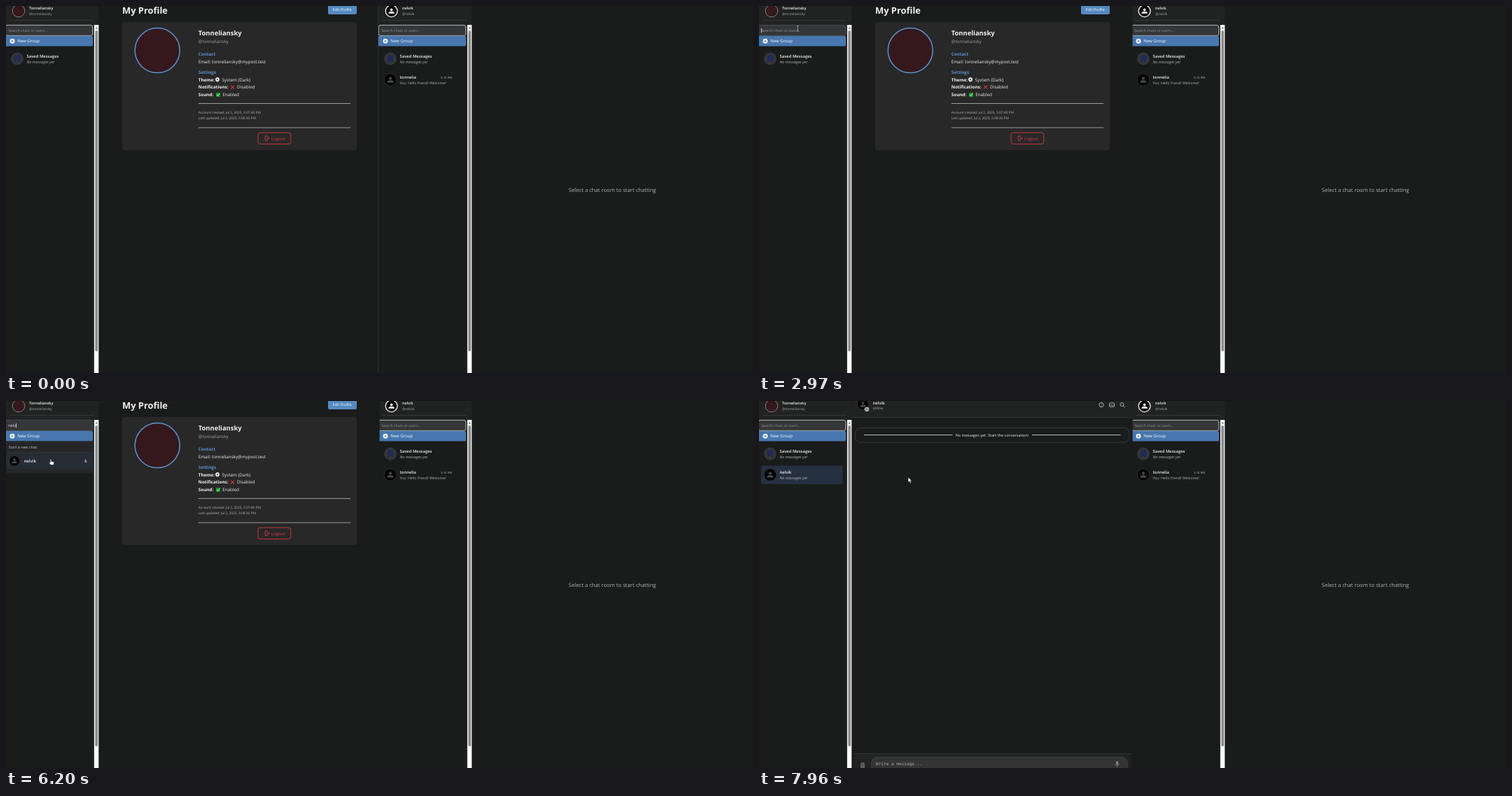
An HTML page that plays this animation: 1067 by 525 pixels, repeating every 7.99 s.

```html
<!DOCTYPE html>
<html lang="en">
<head>
<meta charset="utf-8">
<title>Chat demo</title>
<style>
html, body { margin: 0; width: 100%; height: 100%; overflow: hidden; background: #1a1b1b; }
svg { display: block; width: 100vw; height: 100vh; }
text { font-family: "Open Sans", "Noto Sans", sans-serif; text-rendering: geometricPrecision; white-space: pre; }
.b { font-weight: 700; }
.s { font-weight: 600; }
.i { font-style: italic; }
.m { font-family: "DejaVu Sans Mono", "Liberation Mono", monospace; }
</style>
</head>
<body>
<svg id="stage" viewBox="0 0 1067 525" xmlns="http://www.w3.org/2000/svg"></svg>
<script>
const LOOP = 7990;
const BG = '#1a1b1b', BAR = '#212222', FIELD = '#343637', LIGHT = '#c9cacb', BLUE = '#5b93cf';
const FOCUS = 2730, OPEN = 6690;

const text = (x, y, size, fill, str, cls = '') =>
  `<text x="${x}" y="${y}" font-size="${size}" fill="${fill}" class="${cls}">${str}</text>`;
const rect = (x, y, w, h, fill, extra = '') =>
  `<rect x="${x}" y="${y}" width="${w}" height="${h}" fill="${fill}" ${extra}/>`;
const circle = (x, y, r, fill, extra = '') =>
  `<circle cx="${x}" cy="${y}" r="${r}" fill="${fill}" ${extra}/>`;
const path = (d, stroke, width = 1, fill = 'none') =>
  `<path d="${d}" stroke="${stroke}" stroke-width="${width}" fill="${fill}"/>`;
const group = (id, body, extra = '') => `<g id="${id}" ${extra}>${body}</g>`;

const person = (x, y, s, fill) => circle(x, y - s * .45, s * .45, fill) +
  `<path d="M${x - s} ${y + s * .9}v${-s * .2}q0 ${-s * .55} ${s} ${-s * .55}t${s} ${s * .55}v${s * .2}z" fill="${fill}"/>`;
const avatar = (x, y, r) => circle(x, y, r, '#050505', 'stroke="#38393a" stroke-width=".7"') + person(x, y, r * .5, '#4b4c4d');

const savedRow = () =>
  circle(16, 75.5, 9, '#353637') +
  '<path d="M11.8 70.2h8.4v11l-4.2-3-4.2 3z" fill="#202b56"/>' +
  text(29.5, 74, 5.9, '#eee', 'Saved Messages', 's') +
  text(29.5, 82, 5.45, '#b5b5b5', 'No messages yet', 'i');

function sidebar(id, name, tag, face) {
  return rect(-2, 0, 134, 27, BAR) + rect(5, 20, 120, .8, '#3c3d3d') + face +
    text(33, 4.8, 5.45, '#eee', name, 's') + text(33, 13, 4.8, '#aaa', tag) +
    rect(124.3, 27, 1.7, 498, '#2c2d2d') +
    rect(126, 27, 6.3, 498, '#fff') + rect(127.3, 35, 3.8, 459, '#8b8b8b', 'rx="1.8"') +
    '<path d="M127.4 32.4l1.8-2.6 1.8 2.6z" fill="#777"/>' +
    rect(-.8, 27.4, 124.6, 15, FIELD, `id="${id}Field" rx="2.6" stroke="${LIGHT}" stroke-width=".9"`) +
    group(id + 'Hint', text(3.2, 36.9, 5.25, '#8f9294', 'Search chats or users...')) +
    rect(-1.5, 42.8, 125.5, 14.8, '#4777ae', `id="${id}New" rx="2.2"`) +
    circle(9, 50.2, 3.4, '#fff') + path('M7.2 50.2h3.6M9 48.4v3.6', '#4777ae', .9) +
    text(16.2, 52.4, 6, '#fff', 'New Group');
}

function profile() {
  let cog = '';
  for (let a = 0; a < 360; a += 45) cog += rect(301.3, 102.2, 1.4, 6, '#eee', `transform="rotate(${a} 302 105.2)"`);
  return text(166, 10.8, 12.9, '#f0f0f0', 'My Profile', 'b') +
    rect(460, -6, 41, 18, '#558ac1', 'rx="2.5"') + text(466.8, 7.2, 5.35, '#fff', 'Edit Profile') +
    rect(166, 23, 335, 183, '#282828', 'rx="3.5"') +
    circle(216.2, 63.6, 32, '#35181c', `stroke="${BLUE}" stroke-width="1.5"`) +
    text(274.8, 41.8, 9.4, '#f0f0f0', 'Tonneliansky', 'b') +
    text(274.8, 53.4, 6.3, '#a3a3a3', '@tonneliansky') +
    text(274.8, 70.8, 6.25, BLUE, 'Contact', 'b') +
    text(274.8, 81.6, 6.25, '#eee', 'Email: tonneliansky@mypost.test') +
    text(274.8, 96.8, 6.25, BLUE, 'Settings', 'b') +
    text(274.8, 107.6, 6.3, '#f2f2f2', 'Theme:', 'b') + cog + circle(302, 105.2, 2.2, '#eee') + circle(302, 105.2, 1, '#282828') +
    text(308.6, 107.6, 6.3, '#eee', 'System (Dark)') +
    text(274.8, 118.4, 6.3, '#f2f2f2', 'Notifications:', 'b') +
    path('M321.1 113.6l5 5m0-5l-5 5', '#e0343c', 1.1) + text(330, 118.4, 6.3, '#eee', 'Disabled') +
    text(274.8, 129.2, 6.3, '#f2f2f2', 'Sound:', 'b') +
    rect(299.9, 123.9, 6.2, 6.2, '#159a24', 'rx=".8"') + path('M301.2 127l1.3 1.5 2.5-3', '#fff', .9) +
    text(309.2, 129.2, 6.3, '#eee', 'Enabled') +
    rect(274.8, 139, 217.4, .9, '#a9a9a9') +
    text(274.8, 153.6, 4.82, '#b5b5b5', 'Account created: Jul 2, 2025, 5:07:40 PM') +
    text(274.8, 162.4, 4.82, '#b5b5b5', 'Last updated: Jul 2, 2025, 5:08:30 PM') +
    rect(274.8, 173.6, 217.4, .9, '#a9a9a9') +
    rect(360, 181.2, 46.8, 16.2, 'none', 'rx="3" stroke="#d9363f" stroke-width=".9"') +
    path('M373.4 187.2v-1.2h-3.2v6.6h3.2v-1.2M372 189.3h4m-1.5-1.6l1.6 1.6-1.6 1.6', '#e23b44', .8) +
    text(379, 191.6, 6.05, '#e23b44', 'Logout');
}

function chat() {
  return rect(133, 0, 400, 23.3, BAR) + rect(133, 23.2, 400, .8, '#3a3b3b') +
    avatar(148.5, 4.8, 8) + circle(154, 11.8, 2.8, '#8d8d8d', 'stroke="#ddd" stroke-width=".9"') +
    text(162.5, 4.8, 6, '#eee', 'nelvik', 's') + text(162.5, 12.2, 5, '#b5b5b5', 'online') +
    circle(489, 5.5, 3.2, 'none', 'stroke="#ccc" stroke-width=".8"') + text(487.7, 7.6, 5, '#ccc', '?') +
    rect(500.6, 2.8, 6.8, 5.4, 'none', 'rx=".8" stroke="#ccc" stroke-width=".8"') +
    path('M501 7.6l2-2.4 1.4 1.4 1-.9 1.8 1.8', '#ccc', .7) +
    circle(518.5, 5, 2.5, 'none', 'stroke="#ccc" stroke-width=".8"') + path('M520.3 6.8l2.3 2.3', '#ccc', .8) +
    rect(137.5, 38.5, 391.5, 20.6, 'none', 'rx="7" stroke="#3d3e3e" stroke-width=".9"') +
    rect(150, 48.2, 126.5, .9, '#d5d5d5') + rect(390, 48.2, 126.5, .9, '#d5d5d5') +
    text(280.7, 51, 5.5, '#eee', 'No messages yet. Start the conversation!') +
    rect(136, 504.2, 395, 21, BAR) + rect(136, 504, 395, .8, '#3a3b3b') +
    rect(160.4, 509.4, 366, 22, '#343434', 'rx="9" stroke="#474747" stroke-width=".8"') +
    path('M145.8 525v-5.4a2.2 2.2 0 0 1 4.4 0v5.4M147.2 525v-4.6a.9 .9 0 0 1 1.8 0v4.6', '#aaa', .7) +
    text(167, 521.2, 6.1, '#aaa', 'Write a message...', 'm') +
    rect(510.2, 515.3, 2.8, 5, '#8f8f8f', 'rx="1.4"') +
    path('M508.8 518.6a2.8 2.8 0 0 0 5.6 0M511.6 521.4v2', '#8f8f8f', .7);
}

const result = (y, name) => avatar(12, y, 7.4) + text(25.5, y + 2.2, 6.05, '#eee', name, 's') + person(113.8, y, 2.1, '#aeb0b2');
const panel = h => rect(0, 57.6, 124, h, '#242628') + rect(0, 73, 124, .8, '#36383a') +
  text(3.6, 67.8, 5.35, '#c4c6c8', 'Start a new chat:');

const pointer = {
  arrow: '<path d="M0 0v7.4l1.7-1.6 1.2 2.7 1.5-.7-1.2-2.6h2.3z" fill="#fff" stroke="#000" stroke-width=".5"/>',
  hand: '<path d="M-.8 .2q.8-.9 1.6 0v3l3 .7q1 .4.9 1.4l-.6 3.2h-4.3l-2.6-3.4q.3-1 1.3-.5l.7.7z" fill="#fff" stroke="#000" stroke-width=".5"/>',
  beam: path('M-1.5 -3.6h1.1l.4.4.4-.4h1.1M0 -3.2v6.6M-1.5 3.8h1.1l.4-.4.4.4h1.1', '#c8c8c8', .7)
};

const mine = circle(18, 7, 8.8, '#35181c', 'stroke="#a9a9a9" stroke-width=".7"');
const theirs = circle(17.6, 7.2, 8.4, '#0a0a0a', 'stroke="#f4f4f4" stroke-width="1.3"') + person(17.6, 7.2, 4, '#fff');

document.getElementById('stage').innerHTML =
  rect(0, 0, 1067, 525, BG) +
  group('right', sidebar('r', 'nelvik', '@nelvik', theirs) + savedRow() +
    avatar(16, 105.5, 8.8) + text(29.5, 104.2, 5.9, '#eee', 'tonnelia', 's') +
    text(88, 104, 4.35, '#b5b5b5', '5:10 PM') +
    text(29.2, 112.2, 5.2, '#b5b5b5', 'You: Hello friend! Welcome!'), 'transform="translate(533 0)"') +
  text(803.8, 265.8, 7.68, '#b0b1b1', 'Select a chat room to start chatting') +
  rect(0, 0, 531, 525, BG, 'id="pane"') + rect(531, 0, .8, 525, '#303131', 'id="edge"') +
  sidebar('l', 'Tonneliansky', '@tonneliansky', mine) +
  group('query', text(3.2, 36.9, 5.5, '#eee', '')) + rect(3, 32, .8, 6.2, '#eee', 'id="caret"') +
  group('saved', savedRow()) +
  group('all', panel(93) + result(85.7, 'nadil') + result(109.2, 'nelvik') + result(132.7, 'tonnelia')) +
  group('one', panel(46) + rect(0, 73.8, 124, 23.5, '#252c34', 'id="hover"') + result(85.7, 'nelvik')) +
  group('room', rect(3, 92.5, 116.6, 26.5, '#253040', 'rx="3"') + avatar(16, 105.5, 8.8) +
    text(29.5, 104.2, 5.9, '#eee', 'nelvik', 's') + text(29.5, 112.4, 5.45, '#b5b5b5', 'No messages yet', 'i')) +
  group('profile', profile()) + group('chat', chat()) +
  group('cursor', Object.keys(pointer).map(k => group(k, pointer[k])).join(''));

const $ = id => document.getElementById(id);
const show = (id, on) => { $(id).style.display = on ? '' : 'none'; };
const set = (id, key, value) => $(id).setAttribute(key, value);

// time, x, y of the pointer's hot spot
const route = [
  [720, 872, 521], [850, 706, 478], [1000, 520, 424], [1210, 343, 362], [1500, 257, 299], [1530, 256, 298],
  [1700, 212, 240], [1900, 124, 130], [2060, 73, 72], [2200, 55, 52], [2280, 55, 52], [2370, 55, 52], [2560, 55.4, 32],
  [5720, 55.4, 32], [5850, 57, 47], [6030, 62, 72], [6200, 64, 83], [6270, 64, 83],
  [6660, 64, 83], [6780, 64, 87], [7200, 64, 87], [7420, 92, 88], [7700, 180, 104], [7960, 213, 109]
];
const typed = [[4160, 'n'], [4660, 'ne'], [4740, 'nel'], [4820, 'nelv']];
const caretOn = [[FOCUS, 3270], [3800, 5360], [5890, 6470]];

function place(t) {
  const n = route.findIndex(p => p[0] > t);
  if (n < 0) return route[route.length - 1].slice(1);
  if (n === 0) return route[0].slice(1);
  const [t0, x0, y0] = route[n - 1], [t1, x1, y1] = route[n], k = (t - t0) / (t1 - t0);
  return [x0 + (x1 - x0) * k, y0 + (y1 - y0) * k];
}

function shade(from, to, k) {
  const c = from.map((v, i) => Math.round(v + (to[i] - v) * k));
  return `rgb(${c})`;
}

function draw(t) {
  const [x, y] = place(t);
  const inList = x < 124, open = t >= OPEN, focused = t >= FOCUS && !open;
  const word = open ? '' : typed.reduce((s, [at, str]) => t >= at ? str : s, '');
  const onNew = inList && y > 43 && y < 58;

  show('cursor', t >= 720);
  set('cursor', 'transform', `translate(${x.toFixed(2)} ${y.toFixed(2)})`);
  const kind = !inList || y > 120 ? 'arrow' : y < 43 ? 'beam' : 'hand';
  for (const k in pointer) show(k, k === kind);

  set('lNew', 'fill', onNew ? '#40658f' : '#4777ae');
  const fade = focused ? Math.min(1, (t - FOCUS) / 240) : 0;
  set('lField', 'stroke', shade([201, 202, 203], [80, 82, 84], fade));
  set('pane', 'width', t < FOCUS ? 531 : 533.6);
  show('edge', t < FOCUS);

  const label = $('query').firstChild;
  if (label.textContent !== word) label.textContent = word;
  show('lHint', !word);
  show('caret', focused && caretOn.some(([a, b]) => t >= a && t < b));
  set('caret', 'x', word ? 3.4 + label.getComputedTextLength() : 3);

  const all = t >= 4460 && t < 5140, one = t >= 5140 && !open;
  show('all', all);
  show('one', one);
  show('hover', y > 74);
  show('saved', !all && !one);
  show('room', open);
  show('profile', !open);
  show('chat', open);
}

const start = performance.now();
function tick() {
  draw((performance.now() - start) % LOOP);
  requestAnimationFrame(tick);
}
tick();
</script>
</body>
</html>
```
